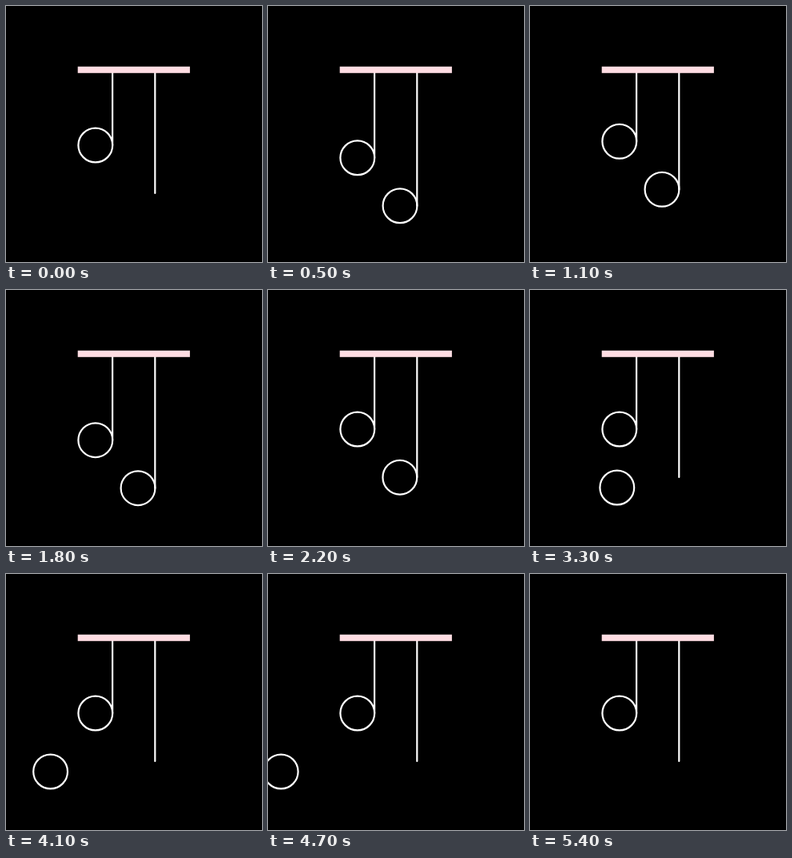
An HTML page for the animation above (6 s loop, 320x320 px).

```html
<!DOCTYPE html>
<html lang="en">
<head>
<meta charset="utf-8">
<title>Rolling note</title>
<style>
  html, body { margin: 0; width: 100%; height: 100%; overflow: hidden; background: #000; }
  svg { display: block; width: 100%; height: 100%; }
  .ink { fill: none; stroke: #fff; stroke-width: 2.2; stroke-linecap: round; }
</style>
</head>
<body>
<svg viewBox="0 0 320 320">
  <g class="ink">
    <line id="stemA" x1="133.1" y1="80" x2="133.1" y2="174"/>
    <circle id="headA" cx="111.8" cy="174" r="21.4"/>
    <line id="stemB" x1="186.3" y1="80" x2="186.3" y2="234"/>
    <circle id="headB" cx="165" cy="234" r="21.4" visibility="hidden"/>
  </g>
  <rect x="89.7" y="75.7" width="140.2" height="8.1" fill="#ffdde3"/>
</svg>
<script>
  const LOOP = 6000, STEP = 100;
  const REST_A = 174, REST_B = 234, FLOOR = 247;
  const SHOW = 100, RELEASE = 2150, GONE = 5400;

  const linear = p => p;
  const accelerate = p => p * p;
  const swing = p => (1 - Math.cos(Math.PI * p)) / 2;

  // Each row: time, value, easing used to reach it
  const bounce = [[0, 0], [430, 16.4, swing], [1055, -5, swing], [1680, 16.4, swing], [2130, 0, swing]];
  const rollX = [[RELEASE, 165], [2700, 146.5, accelerate], [3300, 108.8, linear],
                 [4100, 55.6, linear], [4900, 3.1, linear], [5300, -22.1, linear], [GONE, -30, linear]];
  const dropY = [[RELEASE, REST_B], [2800, FLOOR, swing]];

  function valueAt(track, t) {
    if (t <= track[0][0]) return track[0][1];
    for (let i = 1; i < track.length; i++) {
      const [t0, v0] = track[i - 1];
      const [t1, v1, ease] = track[i];
      if (t < t1) return v0 + (v1 - v0) * ease((t - t0) / (t1 - t0));
    }
    return track[track.length - 1][1];
  }

  const [stemA, headA, stemB, headB] =
    ["stemA", "headA", "stemB", "headB"].map(id => document.getElementById(id));

  function draw(t) {
    const dy = valueAt(bounce, t);
    stemA.setAttribute("y2", REST_A + dy);
    headA.setAttribute("cy", REST_A + dy);
    stemB.setAttribute("y2", REST_B + dy);
    headB.setAttribute("cx", valueAt(rollX, t));
    headB.setAttribute("cy", t < RELEASE ? REST_B + dy : valueAt(dropY, t));
    headB.setAttribute("visibility", t >= SHOW && t < GONE ? "visible" : "hidden");
  }

  const start = performance.now();
  function tick() {
    const t = (performance.now() - start) % LOOP;
    draw(Math.floor(t / STEP) * STEP);
    requestAnimationFrame(tick);
  }
  tick();
</script>
</body>
</html>
```
